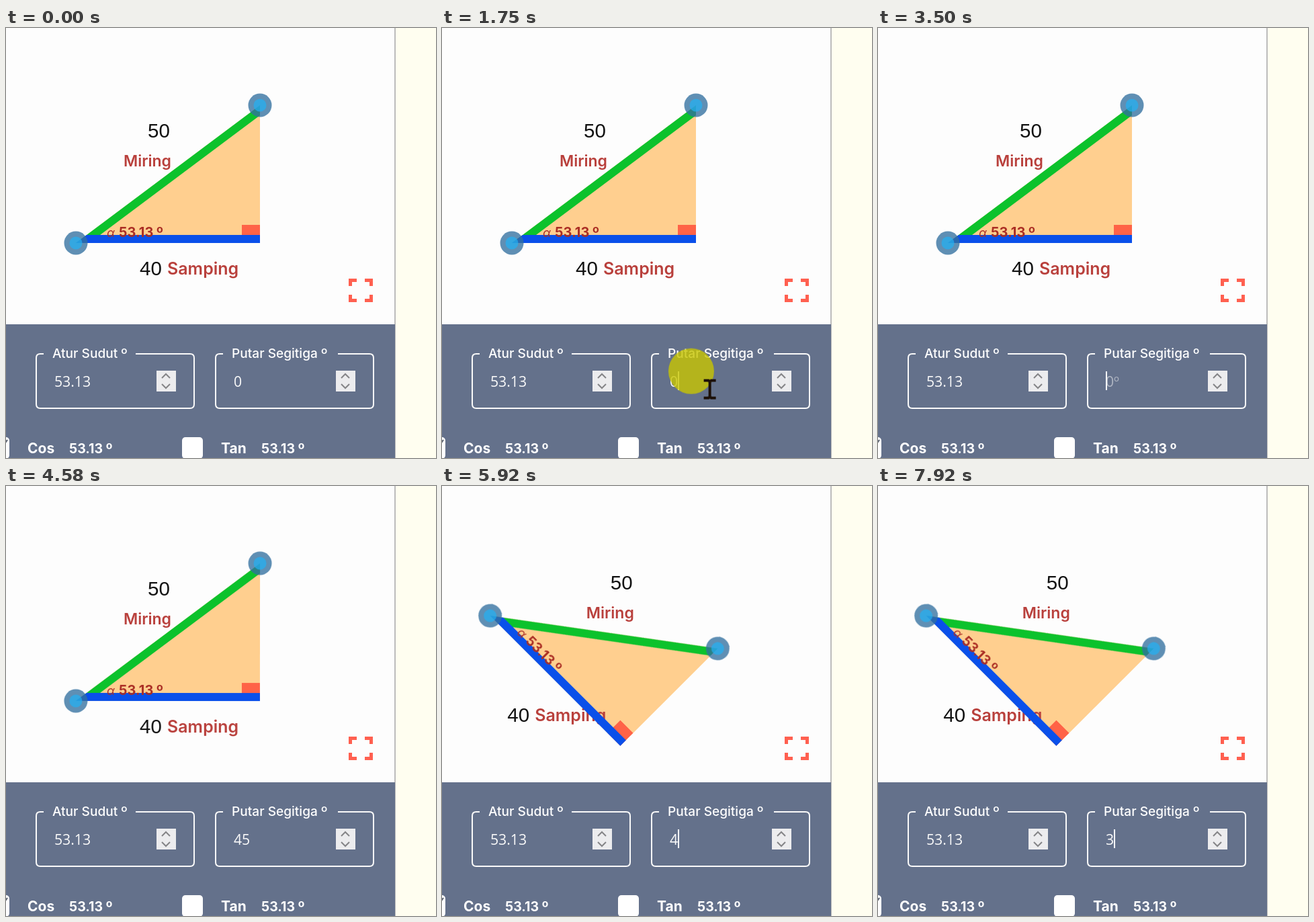
An HTML page for the animation above (8000 ms loop, 640x640 px).

```html
<!DOCTYPE html>
<html lang="id">
<head>
<meta charset="utf-8">
<title>Putar Segitiga</title>
<style>
html, body { margin: 0; width: 100%; height: 100%; overflow: hidden; background: #fdfdfd; }
svg { position: absolute; left: 0; top: 0; width: 640px; height: 640px; }
text { font-family: Inter, sans-serif; font-weight: 600; }
.length { font: 29.5px "Liberation Sans", Arial, sans-serif; fill: #111; }
.side { font-size: 23px; fill: #b9403c; }
#adj .side { font-size: 25px; }
.angle { font-size: 20px; font-weight: 700; fill: #ab2e24; }
.angle.alpha { font-size: 18px; font-weight: 400; font-style: italic; }
.legend { font-size: 19.1px; font-weight: 500; fill: #fff; }
.ratio { font-size: 21px; fill: #fff; }
.ratio text { font-weight: 700; }
.ratio .deg { font-size: 19.5px; }
.input, .value { font: 21.2px "Open Sans", sans-serif; fill: #fafafa; color: #fafafa; }
.value { position: absolute; left: 339px; top: 511px; height: 30px; line-height: 30px; white-space: pre; }

.spin, .upright { animation: turn 8s infinite; }
.spin { transform-origin: 241px 217.5px; }
.upright { animation-name: unturn; }
#hyp { transform-origin: 210px 174px; }
#adj { transform-origin: 271px 349px; }
@keyframes turn {
  0% { transform: rotate(0); }
  57.25% { transform: rotate(0); animation-timing-function: ease; }
  63%, 100% { transform: rotate(45deg); }
}
@keyframes unturn {
  0% { transform: rotate(0); }
  57.25% { transform: rotate(0); animation-timing-function: ease; }
  63%, 100% { transform: rotate(-45deg); }
}

.typed::before { content: "0"; animation: typing 8s step-end infinite; }
@keyframes typing {
  0% { content: "0"; }
  27.1% { content: ""; }
  46.8% { content: "4"; }
  51% { content: "45"; }
  72.8% { content: "4"; }
  78.1% { content: ""; }
  97.8%, 100% { content: "3"; }
}
.hint { opacity: 0; animation: hint 8s step-end infinite; }
@keyframes hint {
  0%, 46.8%, 97.8%, 100% { opacity: 0; }
  27.1%, 78.1% { opacity: .5; }
}
.caret {
  display: inline-block; width: 2px; height: 28px; margin-right: -2px;
  vertical-align: top; background: #fff; animation: blink 8s step-end infinite;
}
@keyframes blink {
  0%, 24%, 30.2%, 38.5%, 56.2%, 70.8%, 82.2%, 92.7% { opacity: 0; }
  16.6%, 27.1%, 34.3%, 42.7%, 67.7%, 72.8%, 88.4%, 97.8%, 100% { opacity: 1; }
}

/* The highlight follows the pointer with a short lag. */
.pointer { animation: show 8s step-end infinite; }
.pointer > * { animation: move 8s linear infinite; }
.pointer > .halo { animation-delay: .14s; animation-fill-mode: backwards; }
@keyframes move {
  0%, 6.2% { transform: translate(424px, 690px); animation-timing-function: ease-out; }
  14.6%, 19.7% { transform: translate(364px, 504px); }
  24%, 100% { transform: translate(432px, 570px); }
}
@keyframes show {
  0%, 27.1%, 100% { opacity: 0; }
  6.2% { opacity: 1; }
}
</style>
</head>
<body>
<svg viewBox="0 0 640 640">
  <defs>
    <clipPath id="inside"><path d="M104 320L378 115V320Z"/></clipPath>
    <g id="knob">
      <circle r="17.5" fill="#33709f" fill-opacity=".78"/>
      <circle r="9.5" fill="#22b0f4" fill-opacity=".7"/>
    </g>
    <g id="spinner">
      <rect x="224" y="510" width="29" height="31" fill="#ececee"/>
      <path d="M232 521l6-6 6 6M232 530l6 6 6-6" fill="none" stroke="#858588" stroke-width="2"/>
    </g>
  </defs>

  <rect width="640" height="640" fill="#fdfdfd"/>
  <rect x="580" width="60" height="640" fill="#fffef0"/>
  <rect x="578" width="2" height="640" fill="#bcbcbc"/>

  <g class="spin">
    <path d="M104 320L378 115V320Z" fill="#ffcf8f"/>
    <rect x="351" y="293" width="27" height="27" fill="#ff6347"/>
  </g>
  <g class="spin"><g id="hyp" class="upright">
    <text class="length" x="211" y="163">50</text>
    <text class="side" x="175" y="206">Miring</text>
  </g></g>
  <g class="spin"><g id="adj" class="upright">
    <text class="length" x="199" y="368">40</text>
    <text class="side" x="240" y="367">Samping</text>
  </g></g>
  <g class="spin">
    <g clip-path="url(#inside)" fill="none" stroke-width="24">
      <path d="M104 320L378 115" stroke="#0cc22c"/>
      <path d="M104 320H378" stroke="#0a50ea"/>
    </g>
    <text class="angle alpha" x="150" y="311">α</text>
    <text class="angle" x="168" y="311">53.13 º</text>
    <use href="#knob" x="104" y="320"/>
    <use href="#knob" x="378" y="115"/>
  </g>

  <path d="M512.5 384V375.5H522M534 375.5H543.5V384M543.5 397V405.5H534M522 405.5H512.5V397"
        fill="none" stroke="#ff6050" stroke-width="5"/>

  <rect y="441" width="579" height="199" fill="#64718b"/>
  <g fill="none" stroke="#fafafa" stroke-width="2">
    <path d="M56 485H51Q45 485 45 491V560Q45 566 51 566H274Q280 566 280 560V491Q280 485 274 485H193"/>
    <path d="M323 485H318Q312 485 312 491V560Q312 566 318 566H541Q547 566 547 560V491Q547 485 541 485H494"/>
  </g>
  <text class="legend" x="69" y="491">Atur Sudut º</text>
  <text class="legend" x="336" y="491">Putar Segitiga º</text>
  <text class="input" x="72" y="534">53.13</text>
  <use href="#spinner"/>
  <use href="#spinner" x="267"/>

  <g fill="#fff">
    <rect x="-26" y="609" width="31" height="32" rx="5"/>
    <rect x="262" y="609" width="31" height="32" rx="5"/>
  </g>
  <path d="M-8 628L2 613" stroke="#505866" stroke-width="2"/>
  <g class="ratio">
    <text x="32" y="633">Cos</text>
    <text class="deg" x="94" y="633">53.13 º</text>
    <text x="320" y="633">Tan</text>
    <text class="deg" x="380" y="633">53.13 º</text>
  </g>
</svg>

<div class="value"><span class="typed"></span><i class="caret"></i><span class="hint">0º</span></div>

<svg viewBox="0 0 640 640">
  <g class="pointer">
    <circle class="halo" r="34" fill="#c8c600" fill-opacity=".8"/>
    <path d="M-9-13H-2L0-11L2-13H9M0-12V12M-9 13H-2L0 11L2 13H9"
          fill="none" stroke="#1c1008" stroke-width="4"/>
  </g>
</svg>
</body>
</html>
```
